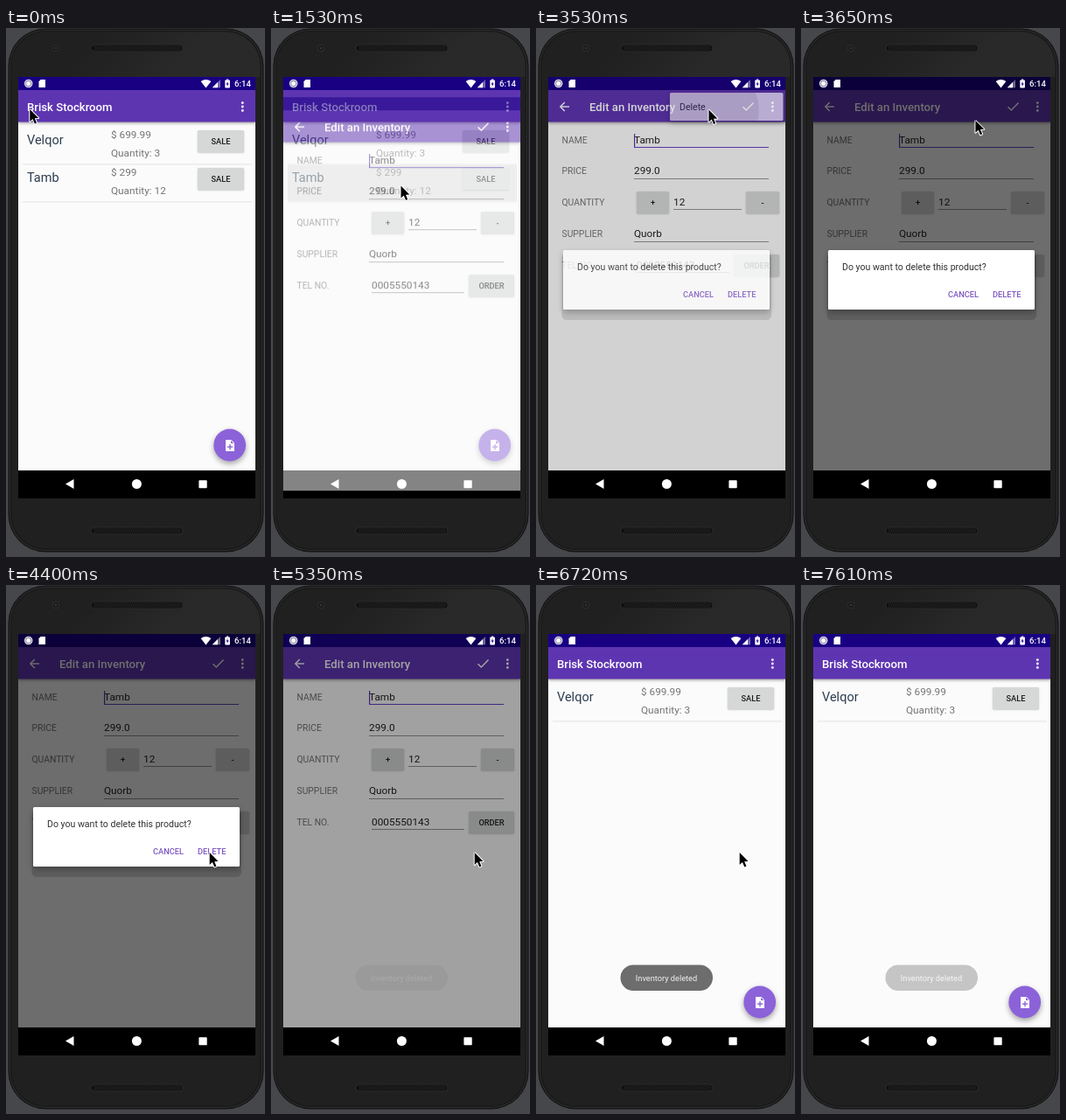
An HTML page with a canvas that plays this animation: 296x605 px, repeating every 7710 ms.

```html
<!DOCTYPE html>
<html lang="en">
<head>
<meta charset="utf-8">
<title>Stock list demo</title>
<style>
html, body { margin: 0; width: 100%; height: 100%; overflow: hidden; background: #45474a; }
canvas { display: block; width: 296px; height: 605px; }
</style>
</head>
<body>
<canvas id="stage" width="296" height="605"></canvas>
<script>
const LOOP = 7710, W = 296, H = 605;
const screen = { x: 14, y: 56, w: 271, h: 482 };
const PURPLE = '#5e35b1', DARK = '#190083', PAPER = '#fbfbfb', GREY = '#757575';
const APP = 'Brisk Stockroom';
const items = [
  { name: 'Velqor', price: '$ 699.99', count: 3 },
  { name: 'Tamb', price: '$ 299', count: 12 }
];

const stage = document.getElementById('stage').getContext('2d');
const makeLayer = () => {
  const c = document.createElement('canvas');
  c.width = W; c.height = H;
  return c.getContext('2d');
};
const editLayer = makeLayer(), popupLayer = makeLayer(), dialogLayer = makeLayer(), toastLayer = makeLayer();
let g = stage;

const clamp = v => Math.max(0, Math.min(1, v));
const span = (t, a, b) => clamp((t - a) / (b - a));
const easeOut = (p, n) => 1 - Math.pow(1 - p, n);
const smooth = p => p * p * (3 - 2 * p);

function rect(x, y, w, h, color) {
  g.fillStyle = color;
  g.fillRect(x, y, w, h);
}
function round(x, y, w, h, r, color) {
  g.fillStyle = color;
  g.beginPath();
  g.roundRect(x, y, w, h, r);
  g.fill();
}
function disc(x, y, r, color) {
  g.fillStyle = color;
  g.beginPath();
  g.arc(x, y, r, 0, 7);
  g.fill();
}
function poly(points, color) {
  g.fillStyle = color;
  g.beginPath();
  points.forEach(([x, y]) => g.lineTo(x, y));
  g.closePath();
  g.fill();
}
function line(points, color, width) {
  g.strokeStyle = color;
  g.lineWidth = width;
  g.beginPath();
  points.forEach(([x, y]) => g.lineTo(x, y));
  g.stroke();
}
function text(s, x, y, size, color, weight = 400, align = 'left') {
  g.font = `${weight} ${size}px Roboto, sans-serif`;
  g.textAlign = align;
  g.fillStyle = color;
  g.fillText(s, x, y);
}
function shadowed(blur, dy, alpha, draw) {
  g.save();
  g.shadowColor = `rgba(0,0,0,${alpha})`;
  g.shadowBlur = blur;
  g.shadowOffsetY = dy;
  draw();
  g.restore();
}
function clipped(x, y, w, h, draw) {
  g.save();
  g.beginPath();
  g.rect(x, y, w, h);
  g.clip();
  draw();
  g.restore();
}
function onLayer(layer, draw) {
  g = layer;
  g.clearRect(0, 0, W, H);
  draw();
  g = stage;
}
function stamp(layer, alpha, dy = 0) {
  g.globalAlpha = alpha;
  g.drawImage(layer.canvas, 0, dy);
  g.globalAlpha = 1;
}

function speaker(y) {
  round(96.5, y, 106, 9, 4.5, '#2c2c2c');
  round(97.5, y + 1, 104, 7, 3.5, '#0f0f0f');
  for (let r = 0; r < 3; r++)
    for (let x = 100 + r % 2; x < 200; x += 2) rect(x, y + 2 + r * 2, 1, 1, '#383838');
}
function phone() {
  rect(0, 0, W, H, '#45474a');
  round(2.5, 0.5, 292, 599, 43, '#141414');
  round(4, 2, 289, 596, 41, '#2e2e2e');
  round(5, 3, 287, 594, 40, '#191919');
  const sheen = g.createLinearGradient(110, 10, 170, 70);
  sheen.addColorStop(0, '#202020');
  sheen.addColorStop(1, '#292929');
  round(6.5, 4.5, 284, 591, 39, '#202020');
  clipped(0, 0, W, 56, () => round(6.5, 4.5, 284, 591, 39, sheen));
  disc(57, 23, 4, '#2e2e2e');
  disc(57, 23, 3, '#191919');
  disc(57, 23, 1.3, '#34373c');
  speaker(18.5);
  speaker(570.5);
  rect(screen.x, screen.y, screen.w, screen.h, '#000');
}

function button(label, x, y, w) {
  shadowed(2, 0.7, 0.22, () => round(x, y, w, 25, 1.5, '#d6d7d7'));
  text(label, x + w / 2, y + 16, 9.23, '#1c1c1c', 500, 'center');
}
function appBar(title, x) {
  rect(14, 56, 271, 450, PAPER);
  shadowed(3, 1, 0.35, () => rect(14, 71, 271, 36.5, PURPLE));
  rect(14, 56, 271, 15, DARK);
  text(title, x, 95, 13.18, '#fff', 500);
  for (const y of [85.6, 90, 94.4]) disc(270.3, y, 1.4, '#fff');
}

function row(item, y) {
  text(item.name, 24, y + 25, 14.5, '#2c3e50');
  text(item.price, 120, y + 18, 11.8, GREY);
  text('Quantity: ' + item.count, 120, y + 39, 11.8, GREY);
  button('SALE', 219, y + 9, 53);
  rect(19, y + 47, 262, 1.6, '#ececec');
}
function fab() {
  shadowed(6, 3, 0.35, () => disc(255.7, 477, 18.4, '#8c62d9'));
  poly([[251, 471], [257.5, 471], [261, 474.5], [261, 484], [251, 484]], '#fff');
  poly([[257, 471.8], [257, 475], [260.2, 475]], '#8c62d9');
  rect(253, 478.4, 6, 1.4, '#8c62d9');
  rect(255.3, 476.1, 1.4, 6, '#8c62d9');
}
function listWindow(t) {
  appBar(APP, 24);
  const press = t < 3000 ? span(t, 1290, 1480) : 0;
  if (press) clipped(19, 155, 262, 44, () => {
    rect(19, 155, 262, 44, `rgba(0,0,0,${0.05 * press})`);
    disc(148, 180, 180 * press, 'rgba(0,0,0,.06)');
  });
  row(items[0], 108);
  if (t < 4000) row(items[1], 151);
  fab();
}

function underline(x1, x2, y, color = '#949494') {
  rect(x1, y, x2 - x1, 1, color);
}
function editWindow(t) {
  appBar('Edit an Inventory', 61);
  line([[38, 90], [28, 90]], '#fff', 1.4);
  line([[32.8, 85], [27.8, 90], [32.8, 95]], '#fff', 1.4);
  line([[236.5, 90.3], [240.3, 94], [248.5, 85.5]], '#fff', 1.5);
  ['NAME', 'PRICE', 'QUANTITY', 'SUPPLIER', 'TEL NO.'].forEach((s, i) =>
    text(s, 29.5, [132, 167, 203, 239, 275][i], 10.35, GREY));
  const value = (s, x, y) => text(s, x, y, 11.8, '#202020');
  value(items[1].name, 112, 132);
  value('299.0', 112, 167);
  value('12', 157, 202.5);
  value('Quorb', 112, 239);
  value('0005550143', 115, 274.5);
  underline(112, 266, 136, '#6540c8');
  underline(112, 266, 172);
  underline(157, 235, 207);
  underline(112, 266, 244);
  underline(115, 221, 279);
  button('+', 115, 187, 37);
  button('-', 240, 187, 38);
  button('ORDER', 226, 259, 52);
  if (t < 2030 || t > 2530) rect(112, 121, 1.2, 15, PURPLE);
}

function popup(t) {
  shadowed(6, 3, 0.35, () => round(153, 74, 129.5, 32, 1.5, '#fafafa'));
  const press = span(t, 3410, 3620);
  if (press) clipped(153, 74, 129.5, 32, () => disc(197.5, 94, 100 * press, 'rgba(0,0,0,.1)'));
  text('Delete', 164, 94, 10.55, '#212121');
}
function dialog() {
  round(29.5, 258, 239.5, 76, 5, 'rgba(0,0,0,.14)');
  shadowed(7, 3, 0.3, () => round(31, 254, 236, 68, 1.5, '#fff'));
  text('Do you want to delete this product?', 47, 277, 10.55, '#303030');
  text('CANCEL', 168, 307.5, 9.23, '#7e57c2', 500);
  text('DELETE', 219, 307.5, 9.23, '#7e57c2', 500);
}
function toast() {
  round(96.5, 434.5, 105.5, 29.5, 14.75, '#6d6d6d');
  text('Inventory deleted', 149, 453, 9.23, '#f0f0f0', 400, 'center');
}

function statusIcons() {
  disc(25.7, 63.5, 4.8, '#d4d2e2');
  disc(25.7, 63.5, 3.4, '#8f8aa8');
  disc(25.7, 63.5, 2.5, '#fff');
  poly([[39.6, 59], [45, 59], [45, 68], [37.5, 68], [37.5, 61.2]], '#fff');
  g.fillStyle = '#fff';
  g.beginPath();
  g.moveTo(228.5, 68.5);
  g.lineTo(222.6, 61);
  g.quadraticCurveTo(228.5, 57, 234.4, 61);
  g.fill();
  poly([[245, 59], [245, 68.3], [235.8, 68.3]], 'rgba(255,255,255,.4)');
  poly([[242, 62], [242, 68.3], [235.8, 68.3]], '#fff');
  round(250.3, 59.5, 5.6, 9, 0.8, '#fff');
  rect(252, 58.5, 2.2, 1.2, '#fff');
  poly([[253.5, 61], [251.5, 64.5], [252.9, 64.5], [252.6, 67], [254.7, 63.6], [253.3, 63.6]], DARK);
  text('6:14', 261, 67.3, 9.6, '#fff', 500);
}
function navIcons() {
  poly([[68, 521.5], [77.5, 515.9], [77.5, 527.1]], '#fff');
  disc(149.4, 521.5, 5.5, '#fff');
  round(220.4, 517.3, 9.3, 9, 0.8, '#fff');
}

// Pointer stops: time, x, y
const path = [
  [120, 27.3, 93], [320, 78, 148], [430, 112, 199], [520, 125, 181],
  [880, 125, 181], [990, 148.5, 180.5], [1600, 148.5, 180.5], [2050, 249, 90],
  [2110, 249, 90], [2340, 268, 89.5], [2620, 268, 89.5], [2990, 197.5, 93.5],
  [3480, 197.5, 93.5], [4170, 230, 303], [4220, 230, 303], [4400, 232.7, 306],
  [6720, 232.7, 306], [7420, 214, 608]
];
// The pointer rests while the confirmation opens
path[12][0] = 3560;
function pointer(t) {
  const i = path.findIndex(p => p[0] > t);
  if (i < 0) return;
  const b = path[i], a = path[Math.max(0, i - 1)];
  const p = i ? smooth(span(t, a[0], b[0])) : 0;
  g.save();
  g.translate(a[1] + (b[1] - a[1]) * p, a[2] + (b[2] - a[2]) * p);
  const shape = [[0, 0], [0, 14], [3.2, 11], [5.6, 16.4], [7.7, 15.5], [5.5, 10.2], [9.8, 10]];
  g.lineJoin = 'round';
  line([...shape, shape[0]], '#fff', 2);
  poly(shape, '#000');
  g.restore();
}

function editState(t) {
  const shift = 0.08 * screen.h;
  if (t < 1496 || t > 5650) return null;
  if (t < 5400) return {
    alpha: easeOut(span(t, 1496, 1696), 4),
    dy: shift * (1 - easeOut(span(t, 1496, 1846), 5))
  };
  return {
    alpha: 1 - span(t, 5500, 5650),
    dy: shift * Math.pow(span(t, 5400, 5650), 4)
  };
}

function draw(t) {
  g = stage;
  phone();
  clipped(screen.x, screen.y, screen.w, screen.h, () => {
    clipped(14, 56, 271, 450, () => listWindow(t));

    const edit = editState(t);
    if (edit) {
      onLayer(editLayer, () => editWindow(t));
      stamp(editLayer, edit.alpha, edit.dy);
    }
    const dim = 0.565 * span(t, 3480, 3650) * (1 - span(t, 5290, 5455));
    if (dim) rect(14, 56, 271, 450, `rgba(0,0,0,${dim})`);
    const menu = span(t, 2520, 2680) * (1 - span(t, 3470, 3630));
    if (menu) {
      onLayer(popupLayer, () => popup(t));
      stamp(popupLayer, menu);
    }
    const box = easeOut(span(t, 3480, 3620), 4) * (1 - span(t, 5290, 5345));
    if (box) {
      onLayer(dialogLayer, dialog);
      stamp(dialogLayer, box);
    }
    statusIcons();
    navIcons();
    const note = easeOut(span(t, 5320, 5820), 2) * (1 - smooth(span(t, 7400, 7760)));
    if (note) {
      onLayer(toastLayer, toast);
      stamp(toastLayer, note);
    }
  });
  pointer(t);
}

let start;
function tick(now) {
  start ??= now;
  draw((now - start) % LOOP);
  requestAnimationFrame(tick);
}
requestAnimationFrame(tick);
</script>
</body>
</html>
```
